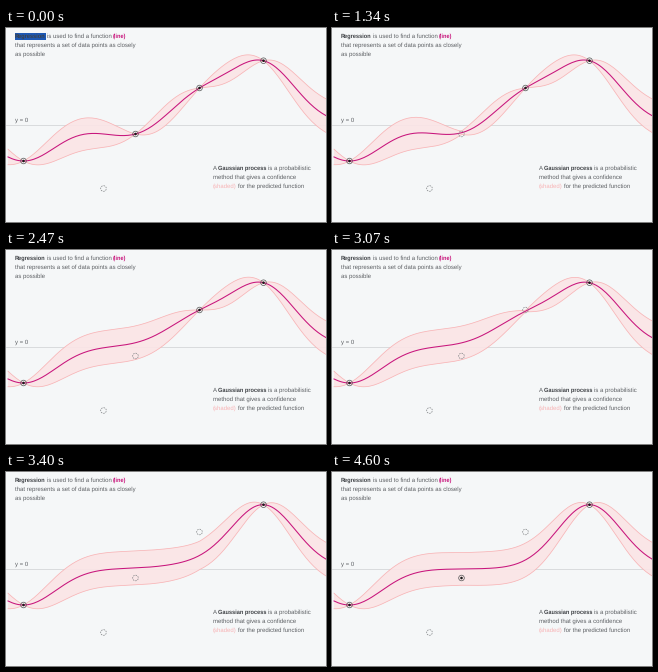
A matplotlib script that plays this animation: 320x194 px, repeating every 4670 ms.

```python
import numpy as np
import matplotlib.pyplot as plt
from matplotlib.animation import FuncAnimation
from matplotlib.patches import Circle, Polygon, Rectangle

W, H, DPI = 320, 194, 100
PX = 72 / DPI                    # points per pixel
LOOP, STEP, TICKS = 4670, 10, 70
BASE, SPREAD, SCALE = 96.5, 17, 32

BG, LINE, EDGE, FILL = "#f5f7f8", "#c8157c", "#f8b3b5", "#fbe5e6"
TEXT, DARK = "#5c5f63", "#3e4145"

plt.rcParams.update({"font.family": "Liberation Sans", "text.hinting": "none"})

POINTS = np.array([(17.5, 133), (129.5, 106), (193.5, 60), (257.5, 32.7)])
SPARE = (97.5, 160.5)
X = np.linspace(2, W, 160)

# (start ms, points in use from then on)
STAGES = [(-9999, (0, 1, 2, 3)), (1310, (0, 2, 3)),
          (3058, (0, 3)), (4592, (0, 1, 3))]
MORPH = 750


def kernel(a, b):
    return np.exp(-(a[:, None] - b[None, :]) ** 2 / (2 * SCALE ** 2))


def posterior(used):
    """Mean and half width of the confidence band, in pixels."""
    px, py = POINTS[list(used)].T
    k = kernel(X, px)
    weights = k @ np.linalg.inv(kernel(px, px))
    var = 1 - (weights * k).sum(axis=1)
    mean = BASE + weights @ (py - BASE)
    return np.array([mean, SPREAD * np.sqrt(np.clip(var, 0, 1))])


CURVES = [posterior(used) for _, used in STAGES]


def ease_out(u):
    return 1 - (1 - min(max(u, 0), 1)) ** 3


fig = plt.figure(figsize=(W / DPI, H / DPI), dpi=DPI, facecolor=BG)
ax = fig.add_axes([0, 0, 1, 1])
ax.set_xlim(0, W)
ax.set_ylim(H, 0)
ax.axis("off")

ax.plot([0, W], [BASE, BASE], color="#d3d5d7", lw=0.8 * PX, zorder=1)
band = ax.add_patch(Polygon([(0, 0), (1, 1)], fc=FILL, ec="none",
                            alpha=0.9, zorder=2))
upper, = ax.plot([], [], color=EDGE, lw=0.75 * PX, zorder=3)
lower, = ax.plot([], [], color=EDGE, lw=0.75 * PX, zorder=3)
mean_line, = ax.plot([], [], color=LINE, lw=1.05 * PX, zorder=4)


def ring(x, y, dashed):
    style = (0, (2.2, 1.4)) if dashed else "-"
    return ax.add_patch(Circle((x, y), 2.8, fill=False, ls=style, zorder=5,
                               ec="#7c7f82" if dashed else "#555555",
                               lw=0.7 * PX))


def dot(x, y):
    return ax.add_patch(Circle((x, y), 1.3, fc="#1a1a1a", ec="none", zorder=6))


ring(*SPARE, True)
dashed_rings = [ring(x, y, True) for x, y in POINTS]
solid_rings = [ring(x, y, False) for x, y in POINTS]
dots = [dot(x, y) for x, y in POINTS]


def write(x, y, text, color=TEXT, bold=False):
    ax.text(x, y, text, color=color, va="baseline", zorder=8,
            fontsize=(5.6 if bold else 6) * PX,
            fontweight="bold" if bold else "normal")


selection = ax.add_patch(Rectangle((9, 5), 30.5, 7, fc="#1d58b4", ec="none",
                                   zorder=7))
write(9, 10, "Regression", DARK, True)
write(41, 10, "is used to find a function")
write(107, 10, "(line)", LINE, True)
write(9, 19, "that represents a set of data points as closely")
write(9, 28, "as possible")
write(9, 94, "y = 0")
write(207, 142, "A")
write(212.5, 142, "Gaussian process", DARK, True)
write(262, 142, "is a probabilistic")
write(207, 151, "method that gives a confidence")
write(207, 160, "(shaded)", EDGE)
write(232, 160, "for the predicted function")


def draw(i):
    tick = int((i * STEP + 5) * TICKS / LOOP)
    t = tick * LOOP / TICKS
    stage = max(n for n, (start, _) in enumerate(STAGES) if t >= start)
    start, used = STAGES[stage]
    u = ease_out((t - start) / MORPH)
    mean, half = CURVES[max(stage - 1, 0)] * (1 - u) + CURVES[stage] * u

    mean_line.set_data(X, mean)
    upper.set_data(X, mean - half)
    lower.set_data(X, mean + half)
    top = np.column_stack([X, mean - half])
    bottom = np.column_stack([X, mean + half])
    band.set_xy(np.vstack([top, bottom[::-1]]))

    for n in range(len(POINTS)):
        on = n in used
        solid_rings[n].set_visible(on)
        dots[n].set_visible(on)
        dashed_rings[n].set_visible(not on)
    selection.set_visible(tick < 7)
    return []


anim = FuncAnimation(fig, draw, frames=LOOP // STEP, interval=STEP,
                     init_func=lambda: draw(0), repeat=True, repeat_delay=0)
plt.show()
```
